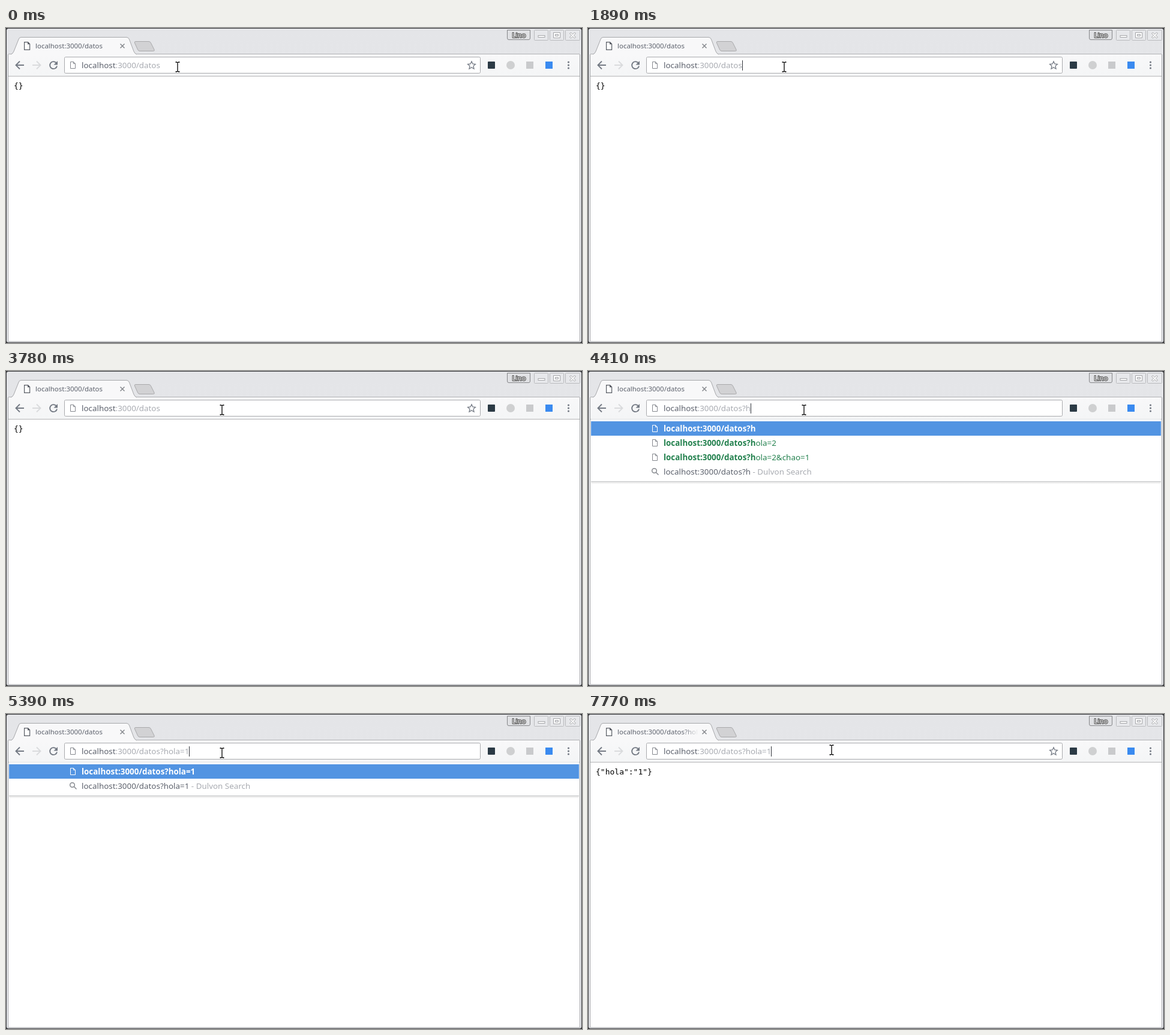
These frames come from a looping animation (960x526 px, 8 s). An HTML page:

```html
<!DOCTYPE html>
<html lang="es">
<head>
<meta charset="utf-8">
<title>localhost:3000/datos</title>
<style>
  html, body { margin: 0; width: 100%; height: 100%; overflow: hidden; background: #fff; }
  svg { display: block; width: 960px; height: 526px; }
  text { font: 13.4px "Noto Sans", sans-serif; white-space: pre; fill: #5c616c; }
  .title, .user { font-size: 11.46px; }
  .mono { font: 13px "DejaVu Sans Mono", monospace; fill: #000; }
  .user { fill: #fff; stroke: #4a4a4a; stroke-width: 2px; paint-order: stroke; stroke-linejoin: round; }
  .dim { fill: #a8abb1; }
  .match { fill: #23814e; }
  .bold { font-weight: 700; }
  .on, .selected tspan { fill: #fff; }
  .line { fill: none; stroke: #747a84; }
</style>
</head>
<body>
<svg viewBox="0 0 960 526">
  <defs>
    <linearGradient id="strip" x2="0" y2="1">
      <stop stop-color="#e4e5e8"/><stop offset="1" stop-color="#e9eaed"/>
    </linearGradient>
    <linearGradient id="bar" x2="0" y2="1">
      <stop stop-color="#f8f8f9"/><stop offset="1" stop-color="#f4f5f6"/>
    </linearGradient>
    <linearGradient id="fade" gradientUnits="userSpaceOnUse" x1="158" x2="184">
      <stop stop-color="#5c616c"/><stop offset="1" stop-color="#5c616c" stop-opacity="0"/>
    </linearGradient>
    <linearGradient id="shade" x2="0" y2="1">
      <stop stop-opacity=".12"/><stop offset="1" stop-opacity="0"/>
    </linearGradient>
    <clipPath id="tabClip"><rect x="45" y="18" width="138" height="22"/></clipPath>
    <path id="page" d="M.5.5h5l3 3v8h-8zM5.5.5v3h3" fill="none"/>
  </defs>

  <!-- window -->
  <rect width="960" height="526" fill="#303134"/>
  <rect x="1" y="1" width="958" height="524" rx="3" fill="url(#strip)"/>
  <path d="M3.5 44V523.5H956.5V44" fill="none" stroke="#a6a8ab"/>
  <rect x="4" y="44" width="952" height="36" fill="url(#bar)"/>
  <rect x="4" y="80" width="952" height="443" fill="#fff"/>
  <path d="M4 80.500H956" stroke="#b4b5b7"/>
  <path d="M4 43.500H956" stroke="#b0b1b4"/>

  <!-- tab -->
  <path d="M8 44Q11.500 43 13 39L21 19Q22 15.500 25 15.500H201Q204 15.500 205.500 19L213 39Q214.500 43 218 44" fill="#f8f8f9" stroke="#a6a7aa"/>
  <path d="M9 44.500H217" stroke="#f8f8f9"/>
  <path d="M216 22.500H238Q240.500 22.500 241.500 25L247 36Q248 38.500 245.500 38.500H223Q220.500 38.500 219.500 36L214.500 25Q213.500 22.500 216 22.500Z" fill="#d2d2d4" stroke="#a9a9ab"/>
  <path d="M30.600 23.600h6l3 3v9.800h-9zM36.600 23.600v3h3" fill="#fff" stroke="#585c64" stroke-width="1.200"/>
  <text class="title" id="title" x="49" y="33.500" clip-path="url(#tabClip)"></text>
  <path d="M190.500 26.500l7 7m0-7l-7 7" stroke="#85888d" stroke-width="1.500"/>

  <!-- window controls -->
  <path d="M835.500 3.500H873.500V17Q873.500 19.500 871 19.500H838Q835.500 19.500 835.500 17Z" fill="#e0e1e4" stroke="#858689"/>
  <text class="user" x="843.500" y="16">Lino</text>
  <g fill="#e7e8eb" stroke="#b9babd">
    <rect x="880.500" y="3.500" width="23" height="17" rx="1"/>
    <rect x="906.500" y="3.500" width="23" height="17" rx="1"/>
    <rect x="932.500" y="3.500" width="24" height="17" rx="1"/>
  </g>
  <g fill="#fff" stroke="#a4a5a8">
    <rect x="887" y="12.500" width="11" height="3"/>
    <path d="M912.500 7.500h11v9h-11zM915.500 10.500h5v3h-5z" fill-rule="evenodd"/>
    <path d="M939.500 9l2-1.500 3 3 3-3 2 1.500-3.200 3.200 3.200 3.200-2 1.600-3-3-3 3-2-1.600 3.200-3.200z"/>
  </g>

  <!-- toolbar -->
  <rect id="ripple" rx="5" fill="#5c616c"/>
  <g fill="none" stroke-width="1.900">
    <path d="M30 62H17M23 55.500L16.500 62l6.500 6.500" stroke="#747a84"/>
    <path d="M44 62h13M51 55.500l6.500 6.500-6.500 6.500" stroke="#dadbdd"/>
    <path d="M83.500 58A6 6 0 1 0 85 63.500" stroke="#747a84"/>
  </g>
  <path d="M86 55v6.500h-6.500z" fill="#747a84"/>
  <rect x="97.500" y="48.500" width="693" height="27" rx="2" fill="#fff" stroke="#a9aaad"/>
  <use href="#page" x="107" y="56" stroke="#85888e"/>
  <path id="star" class="line" stroke-width="1.300" d="M776 55.800l1.900 4.200 4.500.500-3.400 3.100 1 4.500-4-2.300-4 2.300 1-4.500-3.400-3.100 4.500-.5z"/>
  <rect x="803" y="56" width="12" height="12" rx="1" fill="#2b3a45"/>
  <circle cx="841" cy="62" r="7" fill="#cfd0d1"/>
  <rect x="867" y="56" width="12" height="12" fill="#c9cacc"/>
  <rect x="899" y="56" width="12" height="12" fill="#3a8af0"/>
  <g fill="#747a84">
    <circle cx="937.500" cy="57" r="1.600"/><circle cx="937.500" cy="62" r="1.600"/><circle cx="937.500" cy="67" r="1.600"/>
  </g>

  <rect id="highlight" x="126" y="54" height="17" fill="#5294e2"/>
  <text id="url" x="126" y="67"><tspan>localhost</tspan><tspan class="dim" id="path"></tspan></text>
  <rect id="caret" y="54" width="1" height="17" fill="#30333a"/>

  <text class="mono" id="body" x="13" y="101"></text>

  <g id="popup"></g>

  <g id="beam" fill="none">
    <path d="M-3.500-8H-1.500L0-7 1.500-8H3.500M0-7V7M-3.500 8H-1.500L0 7 1.500 8H3.500" stroke="#fff" stroke-width="3"/>
    <path d="M-3.500-8H-1.500L0-7 1.500-8H3.500M0-7V7M-3.500 8H-1.500L0 7 1.500 8H3.500" stroke="#000" stroke-width="1.300"/>
  </g>
  <path id="arrow" d="M0 0V16.500L3.800 13 6.400 19 9 17.800 6.400 12H11.500Z" fill="#000" stroke="#fff"/>
</svg>

<script>
const LOOP = 8000, TICK = 70;
const BASE = 'localhost:3000/datos';
const $ = id => document.getElementById(id);

// [time, value] steps; each value holds until the next one
const typed = [[0, ''], [3990, '?'], [4410, '?h'], [4620, '?ho'], [4760, '?hol'],
  [4830, '?hola'], [4970, '?hola='], [5250, '?hola=1']];
const focus = [[0, 'off'], [1890, 'caret'], [1960, 'all'], [2170, 'caret'], [2730, 'off'],
  [3220, 'caret'], [3780, 'off'], [3990, 'caret'], [5530, 'off'], [6440, 'caret'],
  [6510, 'all'], [6720, 'caret'], [7280, 'off'], [7770, 'caret']];
const popupEnd = [[0, 0], [3990, 184], [5250, 172], [5320, 148], [5390, 136], [5530, 0]];
// [time, x, y], straight lines between
const pointer = [[0, 286, 65], [70, 286, 65], [420, 190, 63.5], [770, 79, 68], [910, 79, 68],
  [1400, 76, 67], [1470, 76, 67], [1750, 327, 65], [1960, 327, 65], [2030, 359, 65],
  [2100, 359, 65], [2170, 360, 65], [6370, 360, 65], [6440, 363, 65], [6580, 406, 60],
  [LOOP, 406, 60]];

const at = (steps, t) => steps.filter(s => s[0] <= t).pop()[1];
const show = (el, on) => el.setAttribute('visibility', on ? 'visible' : 'hidden');
const set = (el, attrs) => { for (const k in attrs) el.setAttribute(k, attrs[k]); };
const span = (cls, s) => `<tspan class="${cls}">${s.replace(/&/g, '&amp;')}</tspan>`;

function pointerAt(t) {
  const i = pointer.findIndex(p => p[0] > t);
  const [t0, x0, y0] = pointer[i - 1], [t1, x1, y1] = pointer[i];
  const k = (t - t0) / (t1 - t0);
  return [Math.round(x0 + (x1 - x0) * k), Math.round(y0 + (y1 - y0) * k)];
}

function popupMarkup(query, end) {
  if (!end) return '';
  const line = BASE + query;
  const past = ['?hola=2', '?hola=2&chao=1'].filter(s => s.startsWith(query));
  const rows = [span('bold on', line)]
    .concat(past.map(s => span('bold match', line) + span('match', s.slice(query.length))))
    .concat(span('', line) + span('dim', ' - Dulvon Search'));
  let out = `<rect x="5" y="80" width="950" height="${end - 80}" fill="#fff"/>
    <path d="M5 80.500H955" stroke="#e2e3e5"/>
    <path d="M5 ${end + .5}H955" stroke="#c9cacc"/>
    <rect x="5" y="${end + 1}" width="950" height="4" fill="url(#shade)"/>
    <rect x="5" y="84" width="950" height="24" fill="#5294e2"/>`;
  rows.forEach((row, i) => {
    const y = 84 + 24 * i;
    out += i < rows.length - 1
      ? `<use href="#page" x="107" y="${y + 6}" stroke="${i ? '#85888e' : '#fff'}"/>`
      : `<g fill="none" stroke="#85888e" stroke-width="1.500"><circle cx="110.500" cy="${y + 10.5}" r="3.800"/><path d="M113.300 ${y + 13.3}l4.200 4.200"/></g>`;
    out += `<text x="126" y="${y + 17}">${row}</text>`;
  });
  return out;
}

function render(t) {
  const query = at(typed, t), mode = at(focus, t), end = at(popupEnd, t);
  const loaded = t >= 5600;

  $('path').textContent = ':3000/datos' + query;
  $('url').setAttribute('class', mode === 'all' ? 'selected' : '');
  const width = Math.round($('url').getComputedTextLength());
  set($('highlight'), { width });
  show($('highlight'), mode === 'all');
  set($('caret'), { x: 126 + width });
  show($('caret'), mode === 'caret');
  show($('star'), !end);

  $('title').textContent = BASE + (loaded ? query : '');
  $('title').style.fill = loaded ? 'url(#fade)' : '';
  $('body').textContent = loaded ? '{"hola":"1"}' : '{}';
  $('popup').innerHTML = popupMarkup(query, end);

  // press feedback on the reload button
  const k = (t - 910) / 490, grow = Math.min(1, k * 2);
  const w = 32 * grow, h = 36 * grow;
  show($('ripple'), k > 0 && k < 1);
  if (k > 0 && k < 1) set($('ripple'), { x: 79 - w / 2, y: 62 - h / 2, width: w, height: h, opacity: .2 * Math.min(1, 2 - 2 * k) });

  const [x, y] = pointerAt(t), overField = x > 97;
  set($('beam'), { transform: `translate(${x} ${y})` });
  set($('arrow'), { transform: `translate(${x - .5} ${y})` });
  show($('beam'), overField);
  show($('arrow'), !overField);
}

let last = -1;
function frame() {
  const t = Math.floor(performance.now() % LOOP / TICK) * TICK;
  if (t !== last) render(last = t);
  requestAnimationFrame(frame);
}
frame();
</script>
</body>
</html>
```
